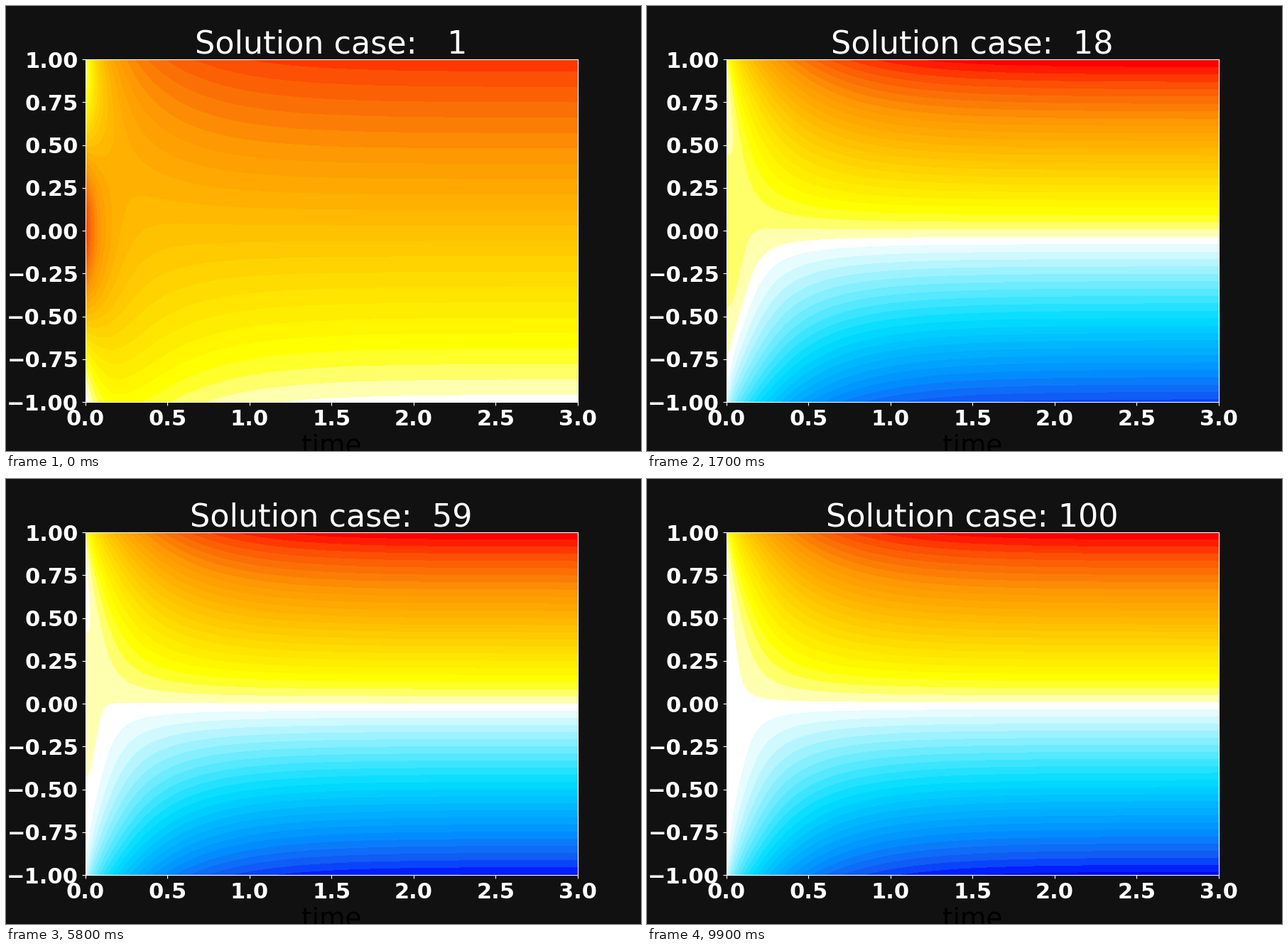
Write a matplotlib script that moves like this. It is 894 px wide and 626 px high and loops after 10 s.

```python
import numpy as np
import matplotlib.pyplot as plt
from matplotlib.animation import FuncAnimation
from matplotlib.colors import LinearSegmentedColormap

W, H, DPI = 894, 626, 100
CASES = 100
HALF = 24              # colour bands on each side of zero
BANDS = 2 * HALF + 1

# Heat equation on [-1, 1] with unit flux at both ends and a start
# profile (1 + cos(pi x)) / k, split into a fixed part and a 1/k part.
x = np.linspace(-1, 1, 101)
t = np.linspace(0, 3, 301)
n = np.arange(200)
lam = (n + 0.5) * np.pi
modes = (np.sin(np.outer(x, lam)) * 2 * (-1.0) ** n / lam**2) \
    @ np.exp(-np.outer(lam**2, t))
flux_part = x[:, None] - modes
start_part = 1 + np.outer(np.cos(np.pi * x), np.exp(-np.pi**2 * t))

STOPS = [
    (-24, "#0000ff"), (-23, "#0020ff"), (-22, "#0a44fa"), (-21, "#105cf5"),
    (-19, "#0a7cfa"), (-18, "#008cff"), (-11, "#00d8ff"), (-10, "#0cdeff"),
    (-1, "#e6fcff"), (0, "#ffffff"), (1, "#ffffb0"),
    (2, "#ffff6a"), (3, "#ffff2a"), (4, "#ffff00"), (13, "#ffb000"),
    (16, "#fe9803"), (19, "#fb7006"), (21, "#fc5004"), (22, "#ff3800"),
    (24, "#ff0000"),
]
cmap = LinearSegmentedColormap.from_list(
    "bands", [((b + HALF) / (2 * HALF), c) for b, c in STOPS], N=BANDS)
palette = cmap(np.arange(BANDS))

plt.rcParams["font.family"] = "DejaVu Sans"
fig = plt.figure(figsize=((W + 0.01) / DPI, (H + 0.01) / DPI), dpi=DPI,
                 facecolor="#111111")
ax = fig.add_axes([0.125, 0.11, 0.775, 0.77])
ax.set(xlim=(0, 3), ylim=(-1, 1),
       xticks=np.arange(0, 3.1, 0.5), yticks=np.arange(-1, 1.1, 0.25))
title = ax.set_title("", fontsize=32, color="white")
ax.set_xlabel("time", fontsize=27, color="black")
ax.tick_params(colors="white", labelsize=22)
for label in ax.get_xticklabels() + ax.get_yticklabels():
    label.set_fontweight("bold")
for spine in ax.spines.values():
    spine.set_color("white")


def update(i):
    k = i + 1
    for old in list(ax.collections):
        old.remove()
    peak = max(1 + 1 / k, 2.2 / k)
    u = np.clip(flux_part + start_part / k, -peak, peak)
    ax.contourf(t, x, u, levels=np.linspace(-peak, peak, BANDS + 1),
                colors=palette)
    title.set_text(f"Solution case: {k:3d}")


anim = FuncAnimation(fig, update, frames=CASES, init_func=lambda: None,
                     interval=100, repeat=True, repeat_delay=0, blit=False)
plt.show()
```
